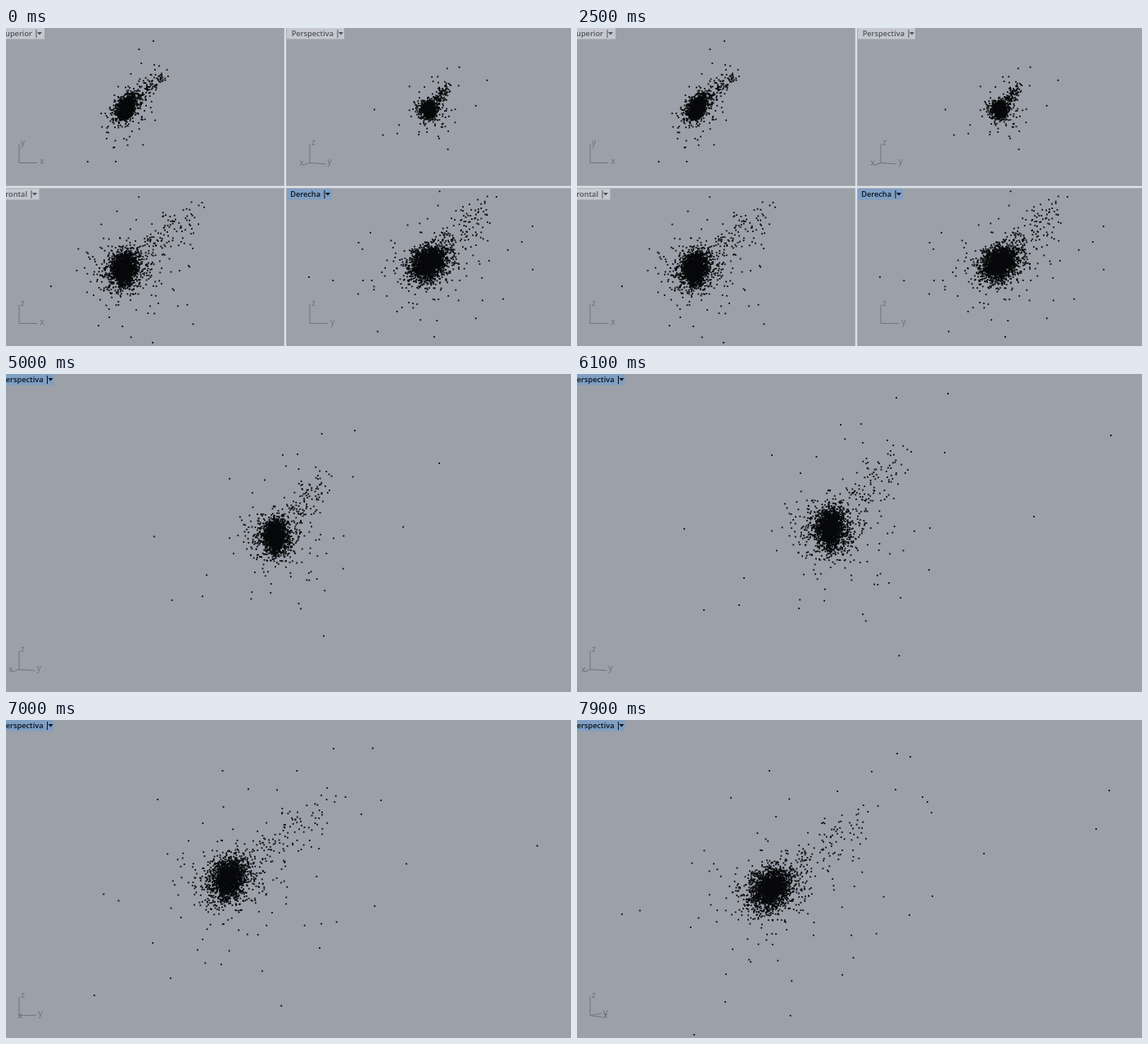
Write an HTML page with a canvas that moves like this. It is 690x388 px and loops after 8 s.

```html
<!DOCTYPE html>
<html lang="es">
<head>
<meta charset="utf-8">
<style>
  html, body { margin: 0; width: 100%; height: 100%; overflow: hidden; background: #9ca0a8; }
  canvas, svg { position: absolute; left: 0; top: 0; width: 690px; height: 388px; }
  .tab { font: 600 9.2px "Open Sans", "Noto Sans", sans-serif; }
  .axis text { font: 10.5px "Open Sans", "Noto Sans", sans-serif; fill: #6c7077; text-anchor: middle; }
  .axis line { stroke: #70747b; stroke-width: 1; }
</style>
</head>
<body>
<canvas id="cloud" width="690" height="388"></canvas>
<svg id="ui" viewBox="0 0 690 388"></svg>
<script>
const LOOP = 8000, STEP = 100, MAXIMIZE = 3900, ORBIT = 6000;
const DOT = 1.8;
const ctx = document.getElementById('cloud').getContext('2d');
const ui = document.getElementById('ui');

// Stray points in the perspective view: x, y at the start and end of the orbit
const strays = [
  [453, 24, 407, 45], [390, 29, 391, 41], [347, 61, 360, 63], [322, 62, 235, 62],
  [379, 81, 389, 85], [349, 84, 318, 87], [449, 96, 428, 100], [404, 117, 433, 113],
  [383, 94, 422, 94], [558, 174, 634, 133], [431, 188, 497, 163], [381, 255, 406, 238],
  [430, 239, 434, 215], [155, 288, 143, 384], [271, 286, 181, 344], [198, 282, 324, 311],
  [204, 249, 212, 295], [262, 188, 55, 237], [238, 99, 188, 95], [131, 189, -160, 230],
  [652, 75, 650, 86]
];
const topStrays = [[180, 16], [181, 45], [182, 51], [134, 163]];
const frontStrays = [[226, 251], [228, 269], [223, 290], [205, 320], [186, 336], [159, 234], [107, 326]];
const rightStrays = [[643, 242], [630, 261], [583, 224], [370, 304], [465, 327], [492, 335], [459, 298]];

let seed = 71;
function rnd() {
  seed = (seed + 0x6D2B79F5) | 0;
  let r = Math.imul(seed ^ (seed >>> 15), 1 | seed);
  r = (r + Math.imul(r ^ (r >>> 7), 61 | r)) ^ r;
  return ((r ^ (r >>> 14)) >>> 0) / 4294967296;
}
const gauss = () => Math.sqrt(-2 * Math.log(1 - rnd())) * Math.cos(2 * Math.PI * rnd());

// Each point is [across, depth, down] around the centre of the cloud
const cloud = [];
function add(count, make) {
  for (let i = 0; i < count; i++) cloud.push(make());
}
function blob(sa, sc, sb) {
  const c = gauss() * sc;
  return [gauss() * sa, c, gauss() * sb - 0.25 * c];
}
add(1300, () => blob(7.2, 12, 11));
add(450, () => blob(15, 18, 16));
add(360, () => {
  const s = 17 * (0.7 - 0.8 * Math.log(1 - rnd()));
  return blob(s, s * 1.15, s);
});
add(110, () => {
  const t = 25 + 90 * rnd();
  return [0.7 * t + gauss() * 13, 0.75 * t + gauss() * 13, -0.75 * t + gauss() * 13];
});

const turn = (p, angle) => p[0] * Math.cos(angle) + p[1] * Math.sin(angle);
const curve = (a, b, c, u) => a * u * (u - 1) / 2 + b * (1 - u * u) + c * u * (u + 1) / 2;
const mix = (a, b, k) => a + (b - a) * k;

// Perspective positions at three camera distances
function near2mid([x, y]) {
  const d = x - 131;
  return [181 + 0.822 * d - 0.000466 * d * (d - 191), 69 + 0.784 * (y - 24)];
}
function mid2small([x, y]) {
  const d = x - 328;
  return [516 + 0.41 * d - 0.00027 * d * d, 99 + 0.4 * (y - 197)];
}
const small2far = ([x, y]) => [2 * (x - 342) - 13, 2 * y];

// Strays swing outward from the middle of the view halfway through the orbit
function strayAt([x0, y0, x1, y1], u) {
  const mid = (x0 + x1) / 2;
  return [curve(x0, mid + 0.21 * (mid - 345), x1, u), mix(y0, y1, (u + 1) / 2)];
}
function orbit(u) {
  const angle = 0.575 * (u + 1);
  const cx = curve(310, 273, 238, u), cy = curve(189, 194, 206, u);
  return cloud.map(p => [cx + turn(p, angle), cy + p[2]])
    .concat(strays.map(s => strayAt(s, u)));
}
function dolly(p, zoom) {
  if (zoom >= 2) return p;
  const mid = near2mid(p);
  const far = zoom < 1 ? small2far(mid2small(mid)) : mid;
  const to = zoom < 1 ? mid : p;
  const k = zoom % 1;
  return [mix(far[0], to[0], k), mix(far[1], to[1], k)];
}
function zoomAt(t) {
  if (t < 5000) return 0;
  if (t < 5100) return 1;
  if (t < 5200) return 1.6;
  return t < 5700 ? 1.95 : 2;
}

function dots(pts, x, y, w, h) {
  ctx.save();
  ctx.beginPath();
  ctx.rect(x, y, w, h);
  ctx.clip();
  ctx.fillStyle = '#08090b';
  for (const p of pts) ctx.fillRect(p[0] - DOT / 2, p[1] - DOT / 2, DOT, DOT);
  ctx.restore();
}

const FRONT = 0.35, RIGHT = 1.57;
const quad = {
  top: cloud.map(p => [147 + 0.42 * turn(p, FRONT), 97 - 0.45 * turn(p, RIGHT)]).concat(topStrays),
  front: cloud.map(p => [145 + 0.8 * turn(p, FRONT), 294 + 0.8 * p[2]]).concat(frontStrays),
  right: cloud.map(p => [517 + 0.8 * turn(p, RIGHT), 287 + 0.8 * p[2]]).concat(rightStrays),
  persp: orbit(-1).map(p => mid2small(near2mid(p)))
};

// Labels and axes
function tab(text, x, y, w, end, active) {
  const ink = active ? '#0c131c' : '#4f545b';
  const sep = end + 5, ax = end + 9;
  return `<g class="tab"><rect x="${x}" y="${y}" width="${w}" height="13.5" fill="${active ? '#7f9fc3' : '#c5c9cf'}"/>
    <text x="${end}" y="${y + 10}" text-anchor="end" fill="${ink}">${text}</text>
    <path d="M${sep} ${y + 2}v10" stroke="${ink}" stroke-width="1"/>
    <path d="M${ax - 3} ${y + 5}h6l-3 3.6z" fill="${ink}"/></g>`;
}
const line = (x, y, dx, dy) => `<line x1="${x}" y1="${y}" x2="${x + dx}" y2="${y + dy}"/>`;
const mark = (s, x, y) => `<text x="${x}" y="${y}">${s}</text>`;

function flatAxes(x, y, across, up) {
  return `<g class="axis">${line(x, y, 0, -23)}${line(x, y, 22, 0)}
    ${mark(up, x + 4.5, y - 22)}${mark(across, x + 28, y + 1)}</g>`;
}
function spaceAxes(x, y, yaw) {
  const s = Math.sin(yaw), c = Math.cos(yaw);
  return `${line(x, y, 0, -23)}${line(x, y, 21 * c, 4 * s)}${line(x, y, -22 * s, 3 * c)}
    ${mark('z', x + 4.5, y - 22)}${mark('y', x + 25 * c + 1, y + 1 + 1.6 * s)}
    ${mark('x', x - 27 * s, y + 2 + 2 * c)}`;
}

const START_YAW = 0.38;
ui.innerHTML = `
  <g id="quad">
    <path d="M341 0V388M0 194H690" stroke="#dde1e8" stroke-width="2.4"/>
    ${tab('Superior', -14, 0, 61, 32)}
    ${tab('Perspectiva', 343, 0, 70, 400)}
    ${tab('Frontal', -14, 196, 54.5, 26)}
    ${tab('Derecha', 343, 196, 55, 384, true)}
    ${flatAxes(16, 164.5, 'x', 'y')}
    ${flatAxes(16, 360.5, 'x', 'z')}
    ${flatAxes(371, 360.5, 'y', 'z')}
    <g class="axis">${spaceAxes(371, 164.5, START_YAW)}</g>
  </g>
  <g id="single">
    ${tab('Perspectiva', -14, 0, 72, 45.5, true)}
    <g class="axis" id="gizmo"></g>
  </g>`;
const [quadUi, singleUi, gizmo] = ['quad', 'single', 'gizmo'].map(id => document.getElementById(id));

function draw(t) {
  const single = t >= MAXIMIZE;
  quadUi.style.display = single ? 'none' : '';
  singleUi.style.display = single ? '' : 'none';
  ctx.clearRect(0, 0, 690, 388);
  if (!single) {
    dots(quad.top, 0, 0, 340, 193);
    dots(quad.persp, 342, 0, 348, 193);
    dots(quad.front, 0, 195, 340, 193);
    dots(quad.right, 342, 195, 348, 193);
    return;
  }
  const u = Math.max(-1, (t - 7000) / 900);
  const zoom = zoomAt(t);
  dots(orbit(u).map(p => dolly(p, zoom)), 0, 0, 690, 388);
  const yaw = t < ORBIT ? START_YAW : -0.04 - 0.54 * u - 0.2 * u * u;
  gizmo.innerHTML = spaceAxes(16, 360.5, yaw);
}

const begin = performance.now();
let shown = -1;
function tick() {
  const t = (performance.now() - begin) % LOOP;
  const step = Math.floor(t / STEP) * STEP;
  if (step !== shown) draw(shown = step);
  requestAnimationFrame(tick);
}
tick();
</script>
</body>
</html>
```
